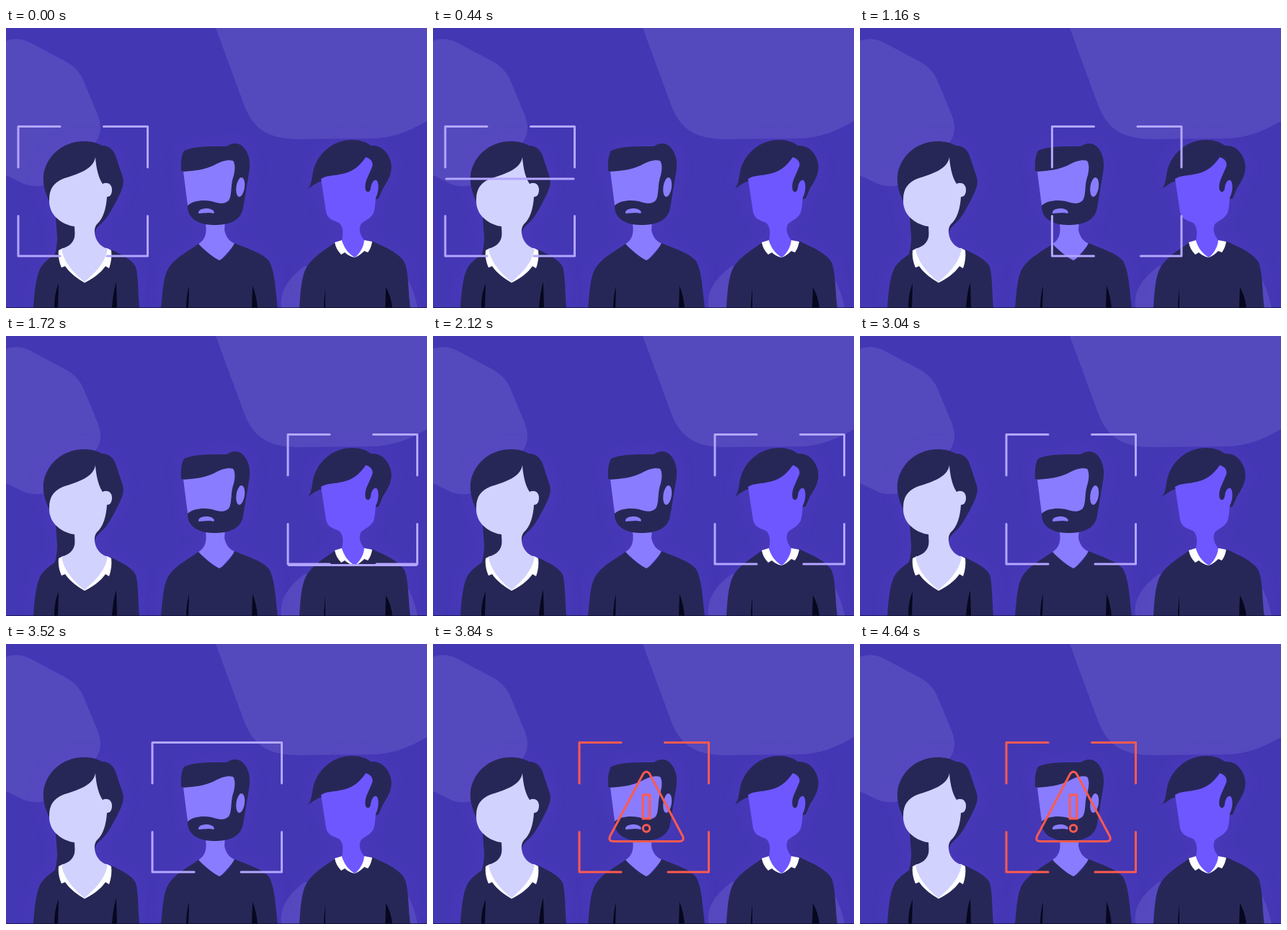
An HTML page that plays this animation: 584 by 388 pixels, repeating every 5.16 s.

```html
<!DOCTYPE html>
<html lang="en">
<head>
<meta charset="utf-8">
<title>Face scan</title>
<style>
  html, body { margin: 0; width: 100%; height: 100%; overflow: hidden; background: #4437b4; }
  svg { display: block; width: 584px; height: 388px; }
  .blob { fill: #5549be; }
  .dark { fill: #272757; }
  .shade { fill: #07071f; }
  .white { fill: #fff; }
  .person { filter: drop-shadow(0 0 11px #6a3fe038); }
  .lines { fill: none; stroke-width: 3; stroke-linecap: round; stroke-linejoin: round; }
</style>
</head>
<body>
<svg viewBox="0 0 584 388">
  <g class="blob">
    <path d="M0 18C10 14 22 14 33 20L82 46C97 54 103 63 108 74L127 120C134 138 132 151 120 164L68 209C56 220 40 222 25 216L0 204Z"/>
    <path d="M291 0L330 106C344 144 368 154 408 154L510 153C542 152 566 139 584 129V0Z"/>
    <path d="M382 388C379 364 392 347 414 330H545C558 344 567 368 571 388Z"/>
  </g>

  <g class="person">
    <path class="dark" d="M60 240C54 228 51 216 52 205C54 181 76 157 108 157C118 157 126 159 133 163C143 163 149 169 152 177L162 207C164 215 162 221 158 230C150 246 142 262 133 270C124 278 122 282 123 290L110 330H60C68 318 71 305 71 290L69 262Z"/>
    <path class="dark" d="M38 388C40 358 43 337 51 328C57 320 67 315 75 308L109 340L146 307C160 314 174 320 180 331C184 346 183 370 185 388Z"/>
    <path class="white" d="M79 305L73 308C72 317 74 325 77 332L82 330C90 341 99 347 109 353C121 347 131 340 138 330L143 333C146 325 147 316 146 308L140 305Z"/>
    <path fill="#d2d2ff" d="M60 238C60 222 67 214 79 209C97 203 121 197 124 179C125 195 129 209 134 216C140 213 147 216 147 224C147 231 144 234 140 234C139 250 135 264 126 272C122 277 122 284 125 292C128 299 134 304 141 306C137 328 121 341 109 352C97 342 81 328 77 306C87 303 93 298 95 290C96 284 95 280 95 275C80 273 66 263 62 251C60 246 60 242 60 238Z"/>
    <path class="shade" d="M73 354C68 366 67 378 67 388H72ZM153 352C149 365 148 377 147 388H154Z"/>
  </g>

  <g class="person">
    <path fill="#8a7cff" d="M277 265H304L303 280C305 290 310 296 318 299L296 324L266 300C276 294 279 285 277 272Z"/>
    <path class="dark" d="M215 388C218 360 218 342 228 329C237 317 255 308 267 299C276 309 286 317 296 322C305 317 312 308 317 298C336 306 356 312 365 323C374 340 374 368 377 388Z"/>
    <path class="dark" d="M243 198C242 186 244 175 247 170C262 163 286 164 306 164C314 159 321 159 327 163C337 171 340 186 337 201L329 249C326 268 308 273 288 273C266 273 251 263 252 246L248 199Z"/>
    <path fill="#8a7cff" d="M246 199C262 198 277 196 289 190C298 185 308 182 315 184C318 188 318 196 316 204C311 217 314 231 309 239C302 246 293 242 285 240C273 238 260 239 252 246Z"/>
    <ellipse cx="325.2" cy="220.500" rx="5.800" ry="13.500" fill="#8a7cff" transform="rotate(8 325.2 220.5)"/>
    <path fill="#8a7cff" d="M267 257C266 251 274 250 279 250C285 250 291 254 288 257C281 255 274 257 267 257Z"/>
    <path class="shade" d="M254 357C251 368 250 379 250 388H253ZM342 357C346 367 348 378 349 388H341Z"/>
  </g>

  <g class="person">
    <path class="dark" d="M407 388C409 360 410 340 420 327C429 315 446 305 457 297L484 312L507 295C525 303 546 312 553 325C559 340 558 370 561 388Z"/>
    <path class="white" d="M456 297L466 294H497L508 296C507 302 505 307 502 311L497 309C493 313 489 316 484 318C478 317 473 314 470 311L465 314C460 309 457 303 456 297Z"/>
    <path class="dark" d="M419 223C425 215 424 205 427 195C434 172 455 155 480 155C491 155 500 158 506 163C520 162 529 171 533 183C538 199 530 211 523 222L517 236L505 240L438 212C431 214 425 218 419 223Z"/>
    <path fill="#6e57ff" d="M437 209C445 204 453 205 462 203C480 201 492 190 499 179C506 181 510 186 508 192C503 205 496 215 499 225C502 229 505 227 506 222C507 214 510 210 514 211C518 215 517 228 513 235C512 243 512 250 510 256C506 264 499 266 493 271C489 277 490 286 497 294C496 304 491 312 484 318C474 312 469 304 466 295C468 284 468 275 462 270C452 266 446 264 444 255Z"/>
    <path class="shade" d="M443 361C442 370 441 380 441 388H443ZM527 359C532 368 535 378 536 388H526Z"/>
  </g>

  <rect y="387" width="584" height="1" fill="#111138" opacity=".7"/>

  <g id="frame" class="lines">
    <path d="M0 193V136.500H58M118.500 136.500H179.500V193M0 260.500V316H58M123 316H179.500V260.500"/>
    <path id="scan" d="M1.500 0H178"/>
  </g>
  <g id="alert" class="lines" stroke="#ff5a4f">
    <path d="M291.500 180Q296 174 300.500 180L346 265.500Q350 273.500 341 273.500H251Q242 273.500 246 265.500Z"/>
    <path stroke-linejoin="miter" d="M291.200 209H300.800V242H291.200Z"/>
    <circle cx="296" cy="255.500" r="4.700"/>
  </g>
</svg>
<script>
  const LOOP = 5160, STEP = 40;
  const LEFT = 17, MIDDLE = 203, RIGHT = 391;
  const SCANS = [160, 1720, 3320], SCAN_TIME = 400;
  const [frame, scan, alertSign] = ['frame', 'scan', 'alert'].map(id => document.getElementById(id));

  // Cubic Bezier ease (.25, .1, .25, 1), solved by bisection
  function ease(x) {
    if (x <= 0) return 0;
    if (x >= 1) return 1;
    let low = 0, high = 1;
    for (let i = 0; i < 20; i++) {
      const s = (low + high) / 2;
      if (.75 * s * (1 - s) + s ** 3 < x) low = s; else high = s;
    }
    return .3 * low * (1 - low) ** 2 + 3 * low ** 2 * (1 - low) + low ** 3;
  }

  function draw(now) {
    const t = Math.floor(now % LOOP / STEP) * STEP;
    const x = LEFT + (RIGHT - LEFT) * ease((t - 942) / 560)
                   + (MIDDLE - RIGHT) * ease((t - 2530) / 510);
    frame.setAttribute('transform', `translate(${x} 0)`);
    frame.setAttribute('stroke', t < 3840 ? '#b3a6ff' : '#ff5a4f');

    // The line sweeps up and back down
    const start = SCANS.find(s => t >= s && t < s + SCAN_TIME);
    scan.style.display = start === undefined ? 'none' : '';
    if (start !== undefined) {
      const p = 1 - Math.abs(2 * (t - start) / SCAN_TIME - 1);
      scan.setAttribute('transform', `translate(0 ${317.5 - 181 * p})`);
    }

    const blinkOff = t >= 4080 && t < 4240 || t >= 4480 && t < 4640;
    alertSign.style.display = t >= 3840 && !blinkOff ? '' : 'none';
  }

  const origin = performance.now();
  (function tick() {
    draw(performance.now() - origin);
    requestAnimationFrame(tick);
  })();
</script>
</body>
</html>
```
